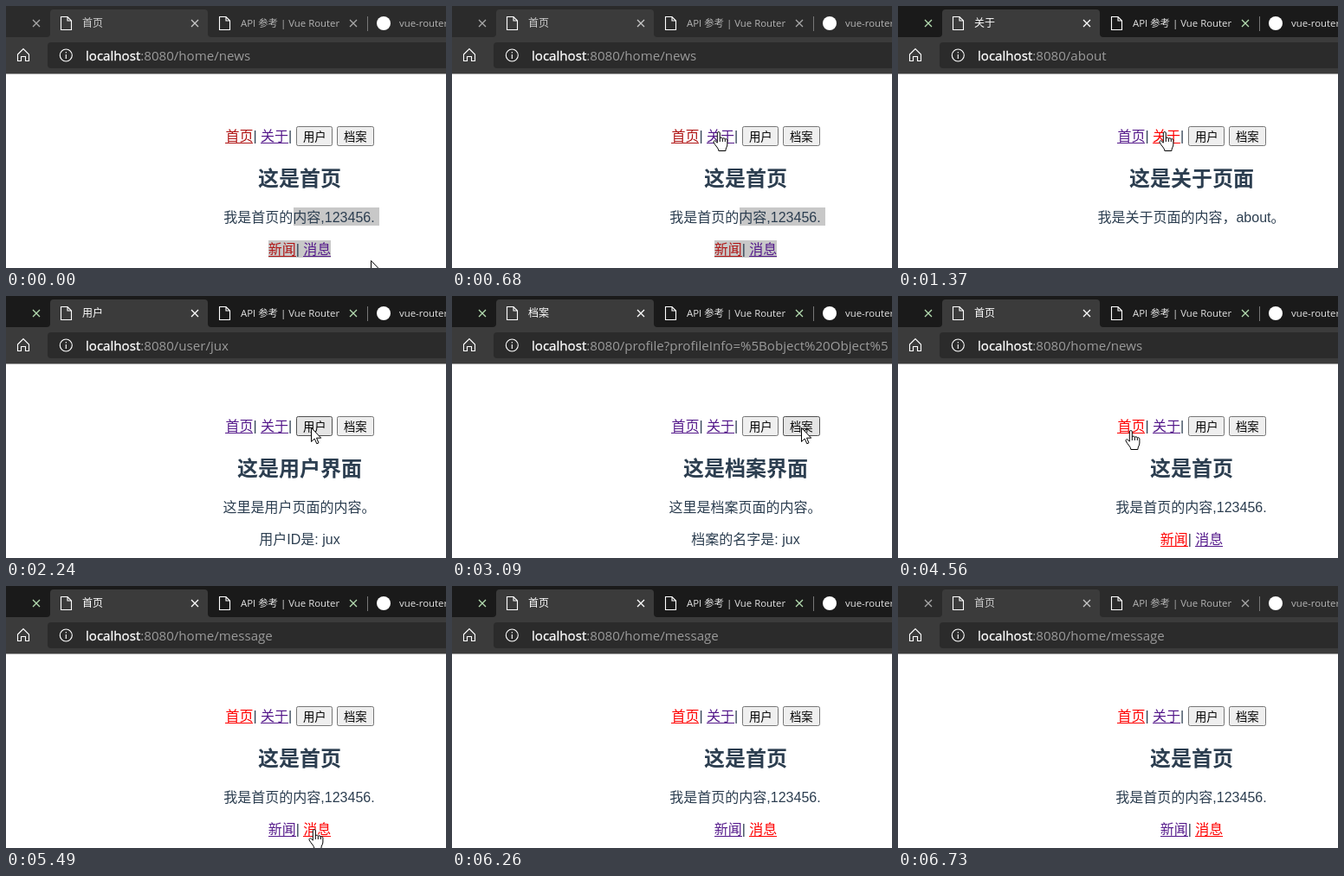
An HTML page that plays this animation: 508x303 px, repeating every 6810 ms.

```html
<!DOCTYPE html>
<html lang="zh-CN">
<head>
<meta charset="utf-8">
<title>路由演示</title>
<style>
html, body { margin: 0; height: 100%; overflow: hidden; background: #fff; }
svg { display: block; width: 100vw; height: 100vh; }
text { font: 16px "Liberation Sans", "Noto Sans CJK SC", "Noto Sans CJK", sans-serif; fill: #2c3e50; }
.mid { text-anchor: middle; }
#head { font-size: 24px; font-weight: 700; }
.tab { font: 11.4px "Open Sans", "Noto Sans CJK SC", "Noto Sans CJK", sans-serif; fill: #b4b4b4; }
#title { font-size: 12px; fill: #d0d0d0; }
.url { font: 15.1px "Open Sans", sans-serif; fill: #9b9b9b; }
.host { fill: #fff; stroke: #fff; stroke-width: .3; }
.btn text { font-size: 13.33px; fill: #000; }
.line { fill: none; stroke: #fff; stroke-width: 1.1; }
.close { stroke: #c8c8c8; stroke-width: 1.3; }
.side { stroke: #a8a8a8; }
.focused .tab { fill: #e4e4e4; }
.focused #title { fill: #fff; }
.focused .close { stroke: #fff; }
.focused .side { stroke: #b4dcb0; }
</style>
</head>
<body>
<svg id="stage" viewBox="0 0 508 303">
  <defs>
    <path id="x" d="M-4-4L4 4M4-4L-4 4"/>
    <path id="doc" d="M.5.5H8L12.5 5V15.5H.5ZM8 .5V5H12.5"/>
  </defs>
  <rect width="508" height="303" fill="#fff"/>
  <rect id="strip" width="508" height="40"/>
  <path d="M0 36H47Q51 36 51 32V8Q51 4 55 4H229Q233 4 233 8V32Q233 36 237 36H508V78.5H0Z" fill="#3b3b3b"/>
  <rect x="48" y="42" width="470" height="30" rx="4" fill="#2b2b2b"/>
  <use href="#x" class="close side" x="35" y="20"/>
  <use href="#x" class="close" x="218" y="20"/>
  <use href="#x" class="close side" x="401" y="20"/>
  <use href="#doc" class="line" x="63" y="12"/>
  <use href="#doc" class="line" x="246" y="12"/>
  <text id="title" class="tab" x="88" y="24"></text>
  <text class="tab" x="271" y="24">API 参考 | Vue Router</text>
  <path d="M417.5 12V29" stroke="#777"/>
  <circle cx="436" cy="20" r="8" fill="#fff"/>
  <text class="tab" x="454" y="24">vue-router</text>
  <path class="line" d="M13.5 56L20 49.6L26.5 56V63.5H22.5V58.5H17.5V63.5H13.5Z"/>
  <circle class="line" cx="69.3" cy="57" r="7"/>
  <path class="line" d="M69.3 56V61M69.3 53V54.5"/>
  <text class="url" x="92" y="63"><tspan class="host">localhost</tspan><tspan>:8080</tspan><tspan id="path"></tspan></text>

  <g id="marked" fill="#c8c8c8">
    <rect x="332" y="233" width="99" height="21"/>
    <rect x="303" y="271" width="72" height="20"/>
  </g>
  <g id="nav"></g>
  <text id="head" class="mid" x="339" y="207.5"></text>
  <text id="body" class="mid" x="338.5" y="250"></text>
  <text id="extra" class="mid" x="339" y="287"></text>
  <g id="sub"></g>
  <g id="arrow" fill="#fff" stroke="#000">
    <path d="M.5.5V16.5L4.2 13L6.8 18.8L9 17.8L6.5 12.2H11.7Z"/>
  </g>
  <g id="hand" fill="#fff" stroke="#000" stroke-linejoin="round">
    <path transform="translate(-4.7 0)" d="M5 1.8C5 .2 8 .2 8 1.8V8C8 6.8 11 6.9 11 8.4C11.2 7.4 14 7.6 14 9.2C14.3 8.3 16.6 8.5 16.6 10.2V15C16.6 18 14.6 19 14.6 22.5H6.6C6.6 19.5 3 17 .8 12.8C.3 11 2 10 3.3 11.4L5 13.2ZM8 8V12M11 8.4V12M14 9.2V12"/>
  </g>
</svg>
<script>
const LOOP = 6810;
const $ = id => document.getElementById(id);
const RED = "#ff0000", DARK_RED = "#b01515", VISITED = "#551a8b";

const home = { title: "首页", head: "这是首页", body: "我是首页的内容,123456." };
const pages = [
  { at: 0, ...home, path: "/home/news" },
  { at: 1310, title: "关于", path: "/about", head: "这是关于页面", body: "我是关于页面的内容，about。" },
  { at: 2240, title: "用户", path: "/user/jux", head: "这是用户界面",
    body: "这里是用户页面的内容。", extra: "用户ID是: jux" },
  { at: 3090, title: "档案", path: "/profile?profileInfo=%5Bobject%20Object%5", head: "这是档案界面",
    body: "这里是档案页面的内容。", extra: "档案的名字是: jux" },
  { at: 3940, ...home, path: "/home/news" },
  { at: 5410, ...home, path: "/home/message" }
];

// Pointer moves: first step, last step, number of steps, end point
const moves = [
  [70, 510, 7, 306, 145],
  [1520, 1750, 4, 352, 152],
  [2630, 2700, 2, 403, 152],
  [3480, 3780, 5, 259, 151],
  [4560, 4560, 1, 267, 155],
  [4640, 5170, 8, 352, 287],
  [5250, 5250, 1, 354, 281],
  [5720, 5890, 3, 364, 286],
  [6180, 6180, 1, 411, 293],
  [6260, 6260, 1, 411, 330]
];

const links = [
  { label: "首页", x: 253.4, y: 156, in: "nav", root: "/home" },
  { label: "关于", x: 294, y: 156, in: "nav", root: "/about", down: [990, 1310] },
  { label: "新闻", x: 302.7, y: 287, in: "sub", root: "/home/news" },
  { label: "消息", x: 343.3, y: 287, in: "sub", root: "/home/message", down: [5320, 5410] }
];
const buttons = [
  { label: "用户", x: 335, width: 42, down: [2070, 2240] },
  { label: "档案", x: 382, width: 43, down: [2930, 3090] }
];

function set(el, attrs) {
  for (const key in attrs) el.setAttribute(key, attrs[key]);
}
function add(parent, tag, attrs, text = "") {
  const el = document.createElementNS("http://www.w3.org/2000/svg", tag);
  set(el, attrs);
  el.textContent = text;
  return parent.appendChild(el);
}
const show = (el, on) => { el.style.display = on ? "" : "none"; };
const during = (t, span) => !!span && t >= span[0] && t < span[1];

for (const link of links) {
  link.text = add($(link.in), "text", { x: link.x, y: link.y }, link.label);
  link.rule = add($(link.in), "rect", { x: Math.round(link.x), y: link.y + 2, width: 32, height: 1 });
}
for (const [group, x, y] of [["nav", 285.4, 156], ["nav", 326, 156], ["sub", 334.7, 287]])
  add($(group), "text", { x, y }, "|");
for (const button of buttons) {
  const g = add($("nav"), "g", { class: "btn" });
  button.box = add(g, "rect", { x: button.x + .5, y: 139.5, width: button.width - 1, height: 22, rx: 1.8 });
  add(g, "text", { x: button.x + 21.3, y: 155.5, class: "mid" }, button.label);
}

function pointer(t) {
  let x = 421, y = 294;
  for (const [from, to, n, endX, endY] of moves) {
    if (t < from) break;
    const gap = n > 1 ? (to - from) / (n - 1) : 1;
    const k = Math.min(n, Math.floor((t - from) / gap + 1e-6) + 1) / n;
    x += (endX - x) * k;
    y += (endY - y) * k;
  }
  return { x: Math.round(x), y: Math.round(y) };
}

function draw(t) {
  const page = pages.findLast(p => t >= p.at);
  const atHome = page.path.startsWith("/home");
  const focused = t >= 990 && t < 6730;
  const marked = t < 990;
  const p = pointer(t);
  const inside = (x, y, w, h) => p.x >= x && p.x <= x + w && p.y >= y && p.y <= y + h;

  for (const id of ["title", "path", "head", "body", "extra"])
    $(id).textContent = page[id] || "";
  show($("sub"), atHome);
  show($("marked"), marked);

  $("stage").classList.toggle("focused", focused);
  set($("strip"), { fill: focused ? "#1a1a1a" : "#2b2b2b" });

  let overLink = false;
  for (const link of links) {
    const active = page.path.startsWith(link.root) || during(t, link.down);
    const fill = active ? (marked ? DARK_RED : RED) : VISITED;
    link.text.style.fill = fill;
    set(link.rule, { fill });
    if ((link.in === "nav" || atHome) && inside(link.x, link.y - 14, 32, 19)) overLink = true;
  }
  for (const button of buttons) {
    const down = during(t, button.down);
    const hover = inside(button.x, 139, button.width, 23);
    set(button.box, {
      fill: down ? "#f5f5f5" : hover ? "#e5e5e5" : "#efefef",
      stroke: down ? "#8d8d8d" : hover ? "#4f4f4f" : "#767676"
    });
  }

  const hand = overLink && t >= 680;
  show($("hand"), hand);
  show($("arrow"), !hand);
  set($(hand ? "hand" : "arrow"), { transform: `translate(${p.x} ${p.y})` });
}

const start = performance.now();
function tick() {
  draw((performance.now() - start) % LOOP);
  requestAnimationFrame(tick);
}
tick();
</script>
</body>
</html>
```
